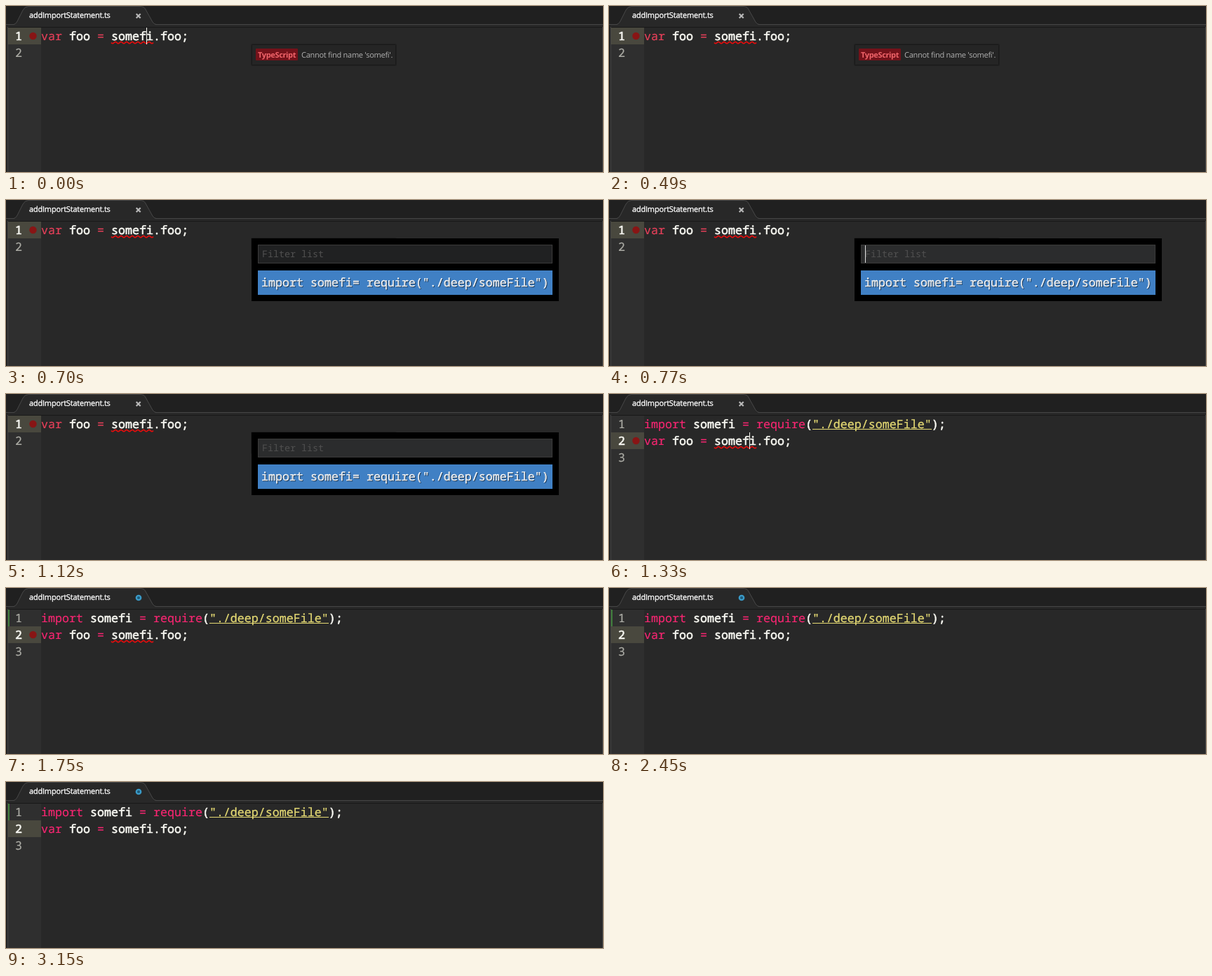
Recreate the animation shown at these times as an HTML page. Size 851 px wide and 238 px high, loop 3.22 s.

```html
<!DOCTYPE html>
<html lang="en">
<head>
<meta charset="utf-8">
<title>Add import statement</title>
<style>
  html, body { margin: 0; width: 100%; height: 100%; overflow: hidden; background: #282828; }
  svg { display: block; text-rendering: geometricPrecision; }
  .code { font: 16.667px "Noto Sans Mono", monospace; fill: #f8f8f2; stroke: #f8f8f2; stroke-width: .6px; }
  .ui { font: 11px "Open Sans", "Noto Sans", sans-serif; }
  .key { fill: #e8405a; stroke: #e8405a; stroke-width: .15px; }
  .edited .key { fill: #f92672; stroke: #f92672; }
  .str { fill: #e6db74; stroke: #e6db74; stroke-width: .25px; }
  .dim { fill: #adada6; stroke: #adada6; stroke-width: .2px; }
  .item { fill: #fff; stroke: #fff; stroke-width: .4px; text-shadow: 1px 1px 0 rgba(0, 0, 0, .45); }
  .hint { font-size: 13.333px; fill: #505050; stroke: none; }
</style>
</head>
<body>
<svg id="stage" width="851" height="238" viewBox="0 0 851 238">
  <rect width="851" height="238" fill="#282828"/>

  <!-- tab bar -->
  <rect width="851" height="26" fill="#202020"/>
  <rect y="26" width="851" height="1" fill="#464646"/>
  <path d="M11 27Q14 26 16 22L24 6Q27 1 32 1H191Q197 1 199 5L209 23Q211 26 214 27" fill="#282828"/>
  <path d="M11 26.5Q14 26 16 22L24 6Q27 .5 32 .5H191Q197 .5 199 5L209 23Q211 26 214 26.5" fill="none" stroke="#484848"/>
  <rect y="30" width="851" height="1" fill="#181818"/>
  <text class="ui" x="33" y="17" fill="#fff" stroke="#fff" stroke-width=".3" letter-spacing="-.2">addImportStatement.ts</text>
  <path id="close" d="M185.7 11.2l6 6m0-6l-6 6" stroke="#b8b8b8" stroke-width="2.2"/>
  <circle id="dirty" cx="189" cy="14" r="3.2" fill="#1f5a78" stroke="#3a9bc8" stroke-width="2.3"/>

  <!-- window edges and gutter -->
  <rect y="27" width="2" height="211" fill="#202020"/>
  <rect x="2" y="30" width="1" height="208" fill="#464646"/>
  <rect x="850" y="30" width="1" height="208" fill="#464646"/>
  <rect x="3" y="31" width="47" height="207" fill="#2f2f2f"/>
  <rect id="active" x="3" y="31" width="47" height="24" fill="#49483e"/>
  <rect id="added" x="3" y="31" width="2" height="24" fill="#3f7d3a"/>
  <g class="code">
    <text class="num" x="13" y="49">1</text>
    <text class="num" x="13" y="73">2</text>
    <text class="num" x="13" y="97">3</text>
  </g>

  <!-- code -->
  <text id="import" class="code" x="50" y="49"><tspan class="key">import</tspan> somefi <tspan class="key">=</tspan> <tspan class="key">require</tspan>(<tspan class="str">"./deep/someFile"</tspan>);</text>
  <rect id="underline" x="290" y="50" width="170" height="1" fill="#e6db74"/>
  <g id="line">
    <text class="code" x="50" y="49"><tspan class="key">var</tspan> foo <tspan class="key">=</tspan> somefi.foo;</text>
    <g id="error">
      <circle cx="38.5" cy="43" r="5.2" fill="#881515"/>
      <path id="wave" fill="none" stroke="#e80c0c" stroke-width="1.7"/>
    </g>
    <rect id="caret" x="200" y="31" width="1" height="24" fill="#f8f8f0"/>
  </g>

  <!-- error message -->
  <g id="tip" class="ui">
    <rect x="349" y="54" width="208" height="32" rx="2" fill="#202020"/>
    <rect x="350.5" y="55.5" width="205" height="29" rx="1" fill="#252525" stroke="#1a1a1a"/>
    <rect x="356" y="61" width="60" height="17" rx="1" fill="#74121a"/>
    <text x="359" y="74" fill="#f0646a" font-weight="700" letter-spacing="-.36">TypeScript</text>
    <text x="421" y="74" fill="#b0b0b0" letter-spacing="-.27">Cannot find name 'somefi'.</text>
  </g>

  <!-- suggestion list -->
  <g id="popup">
    <rect x="350" y="55" width="438" height="90"/>
    <rect id="filter" x="359.5" y="64.5" width="419" height="26" stroke="#3a3a3a"/>
    <text class="code hint" x="365" y="82">Filter list</text>
    <rect id="filterCaret" x="365" y="65" width="1" height="25" fill="#e0e0e0"/>
    <rect x="359" y="101" width="420" height="35" fill="#4080c4"/>
    <text class="code item" x="364" y="124">import somefi= require("./deep/someFile")</text>
  </g>
</svg>
<script>
  const LOOP = 3220;
  const $ = id => document.getElementById(id);
  const show = (id, on) => $(id).style.display = on ? "" : "none";
  const nums = document.querySelectorAll(".num");

  $("wave").setAttribute("d", "M150 52.5q2 2.4 4 0" + "t4 0".repeat(14));

  function draw(now) {
    const t = now % LOOP;
    const within = (from, to) => t >= from && t < to;
    const edited = t >= 1330, saved = t < 1540;
    const row = edited ? 1 : 0;

    $("stage").classList.toggle("edited", edited);
    $("line").setAttribute("transform", `translate(0 ${row * 24})`);
    $("active").setAttribute("y", 31 + row * 24);
    nums.forEach((n, i) => {
      n.classList.toggle("dim", i !== row);
      n.style.display = i < row + 2 ? "" : "none";
    });

    show("import", edited);
    show("underline", edited);
    show("close", saved);
    show("dirty", !saved);
    show("added", !saved);
    show("error", t < 2450);
    show("caret", t < 490 || within(1260, 1750) || within(2100, 2450) || within(2800, 3150));
    show("tip", !edited);
    show("popup", within(700, 1260));
    show("filterCaret", within(770, 1120));
    $("filter").setAttribute("fill", t < 770 ? "#202122" : "#2b2c2d");
  }

  const start = performance.now();
  function tick() {
    draw(performance.now() - start);
    requestAnimationFrame(tick);
  }
  tick();
</script>
</body>
</html>
```
